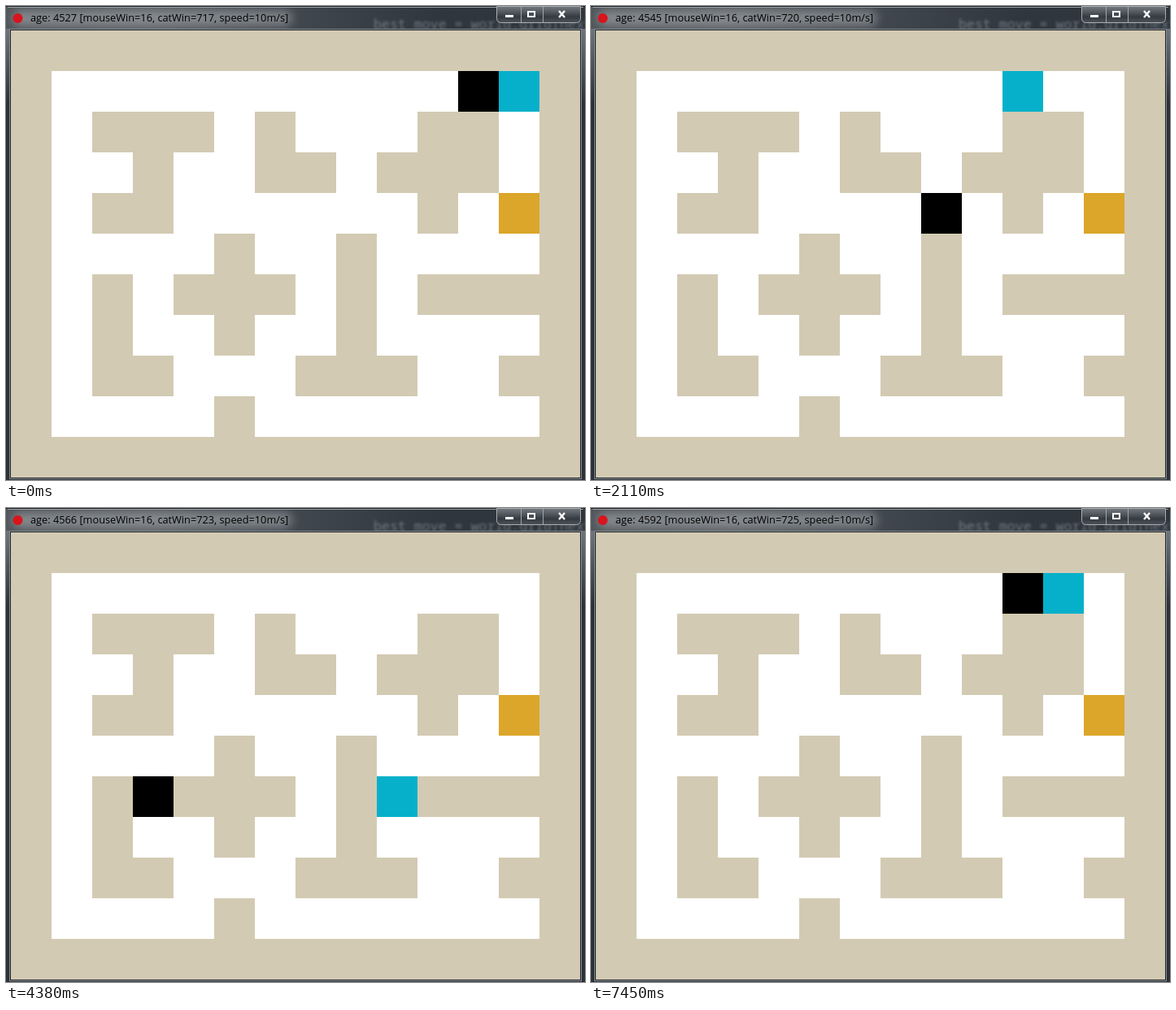
Write an HTML page with a canvas that moves like this. It is 712x583 px and loops after 7.55 s.

```html
<!DOCTYPE html>
<html lang="en">
<head>
<meta charset="utf-8">
<title>Maze chase</title>
<style>
html, body { margin: 0; width: 100%; height: 100%; overflow: hidden; background: #2c3138; }
canvas { display: block; }
</style>
</head>
<body>
<canvas id="stage" width="712" height="583"></canvas>
<script>
const W = 712, H = 583, LOOP = 7550, REDRAW = 140;
const CELL = 50, LEFT = 56, TOP = 80, LAST_STEP = 65;
const WALL = '#d3cab3', CHEESE = '#dba629', MOUSE = '#06b0ca', CAT = '#000';
const ctx = document.getElementById('stage').getContext('2d');

const maze = [
  '............',
  '.###.#...##.',
  '..#..##.###.',
  '.##......#..',
  '....#..#....',
  '.#.###.#.###',
  '.#..#..#....',
  '.##...###..#',
  '....#.......'
];

// [time in ms, world step]; the speed wavers a little between them
const pace = [[0, 0], [1270, 11], [2920, 26], [4380, 39], [5190, 46], [6370, 56], [7450, LAST_STEP]];

// Where the mouse goes: [world step, column, row]
const mouseStops = [
  [0, 11, 0], [2, 6, 3], [7, 11, 8], [10, 10, 8], [11, 9, 8],
  [14, 9, 0], [21, 10, 0], [23, 2, 8], [33, 0, 4], [38, 8, 5],
  [40, 9, 6], [45, 8, 5], [46, 9, 4], [47, 8, 3], [49, 7, 2],
  [52, 7, 8], [57, 6, 8], [58, 8, 0], [63, 9, 0], [64, 10, 0]
];

const same = (a, b) => a[0] === b[0] && a[1] === b[1];

function neighbours([c, r]) {
  const list = [];
  for (const dr of [1, 0, -1]) {
    for (const dc of [-1, 0, 1]) {
      if ((dc || dr) && maze[r + dr]?.[c + dc] === '.') list.push([c + dc, r + dr]);
    }
  }
  return list;
}

// Breadth-first distances to a goal, keyed by "column,row"
function distances(goal) {
  const dist = { [goal]: 0 };
  const queue = [goal];
  for (const at of queue) {
    for (const next of neighbours(at)) {
      if (next in dist) continue;
      dist[next] = dist[at] + 1;
      queue.push(next);
    }
  }
  return dist;
}

function chase(cat, mouse) {
  if (same(cat, mouse)) return cat;
  const dist = distances(mouse);
  return neighbours(cat).find(n => dist[n] < dist[cat]);
}

function mouseAt(step) {
  return mouseStops.filter(s => s[0] <= step).pop().slice(1);
}

function simulate() {
  const states = [{ cat: [10, 0], mouse: mouseAt(0), wins: 717 }];
  for (let step = 1; step <= LAST_STEP; step++) {
    const last = states[step - 1];
    const mouse = mouseAt(step);
    const caught = same(last.cat, last.mouse) && !same(mouse, last.mouse);
    states.push({ cat: chase(last.cat, mouse), mouse, wins: last.wins + caught });
  }
  return states;
}

function stepAt(t) {
  const i = pace.findIndex(p => p[0] > t);
  if (i < 0) return LAST_STEP;
  const [t0, s0] = pace[i - 1], [t1, s1] = pace[i];
  const count = Math.round((t1 - t0) / REDRAW);
  const shown = Math.floor((t - t0) / (t1 - t0) * count);
  return s0 + Math.floor(shown * (s1 - s0) / count);
}

function box(g, x, y, w, h, color) {
  g.fillStyle = color;
  g.fillRect(x, y, w, h);
}

function cell(g, [c, r], color) {
  box(g, LEFT + c * CELL, TOP + r * CELL, CELL, CELL, color);
}

function gradient(g, x0, y0, x1, y1, ...colors) {
  const grad = g.createLinearGradient(x0, y0, x1, y1);
  colors.forEach((color, i) => grad.addColorStop(i / (colors.length - 1), color));
  return grad;
}

function line(g, x0, y0, x1, y1) {
  g.beginPath();
  g.moveTo(x0, y0);
  g.lineTo(x1, y1);
  g.stroke();
}

function drawTitleBar(g) {
  box(g, 0, 0, W, 30, gradient(g, 0, 0, W, 0, '#51565b', '#5a5f64', '#41474e', '#30363d', '#2f353c'));
  g.save();
  g.beginPath();
  g.rect(0, 0, W, 28);
  g.clip();
  g.filter = 'blur(1.6px)';
  g.font = '16.6px "Noto Sans Mono", monospace';
  g.fillStyle = 'rgba(150,162,175,.6)';
  g.fillText('best move = world.grid[next]', 452, 28);
  g.filter = 'blur(6px)';
  g.fillStyle = 'rgba(168,172,176,.6)';
  g.beginPath();
  g.roundRect(8, 6, 344, 18, 9);
  g.fill();
  g.restore();
  box(g, 0, 0, W, 1, '#1b1e22');
  box(g, 2, 1, W - 4, 1, '#9fa4a8');
  g.fillStyle = '#d8141c';
  g.beginPath();
  g.arc(14.5, 15, 6, 0, Math.PI * 2);
  g.fill();
}

function drawButtons(g) {
  g.beginPath();
  g.roundRect(603.5, 0.5, 103, 20, [0, 0, 5, 5]);
  g.fillStyle = gradient(g, 0, 0, 0, 20, '#777c81', '#575c62', '#343a41', '#4b5157');
  g.fill();
  g.strokeStyle = '#a9adb1';
  g.lineWidth = 1;
  g.stroke();
  box(g, 633, 1, 1, 19, '#a0a5a9');
  box(g, 660, 1, 1, 19, '#a0a5a9');
  box(g, 614, 11, 10, 3, '#fff');
  g.strokeStyle = '#fff';
  g.lineWidth = 2;
  g.strokeRect(642, 7, 8, 6);
  g.lineWidth = 2.4;
  line(g, 680, 6, 687, 14);
  line(g, 687, 6, 680, 14);
}

function makeScene() {
  const scene = document.createElement('canvas');
  scene.width = W;
  scene.height = H;
  const g = scene.getContext('2d');
  box(g, 0, 0, W, H, '#2c3138');
  drawTitleBar(g);
  // Glass sides, lighter towards the top
  const glass = gradient(g, 0, 28, 0, 120, '#6d747b', '#2c3138');
  box(g, 0, 28, 4, H - 28, glass);
  box(g, 708, 28, 4, H - 28, glass);
  box(g, 4, 28, 704, 554, '#878d92');
  box(g, 5, 29, 702, 552, '#22262a');
  box(g, 6, 30, 700, 550, WALL);
  drawButtons(g);
  maze.forEach((row, r) => [...row].forEach((ch, c) => {
    if (ch === '.') cell(g, [c, r], '#fff');
  }));
  cell(g, [11, 3], CHEESE);
  return scene;
}

const scene = makeScene();
const states = simulate();

function draw(t) {
  const step = stepAt(t);
  const { cat, mouse, wins } = states[step];
  ctx.drawImage(scene, 0, 0);
  ctx.font = '12.75px "Open Sans", "Noto Sans", sans-serif';
  ctx.fillStyle = '#000';
  ctx.fillText(`age: ${4527 + step} [mouseWin=16, catWin=${wins}, speed=10m/s]`, 30, 19);
  cell(ctx, mouse, MOUSE);
  cell(ctx, cat, CAT);
}

const start = performance.now();
function tick() {
  draw((performance.now() - start) % LOOP);
  requestAnimationFrame(tick);
}
tick();
</script>
</body>
</html>
```
